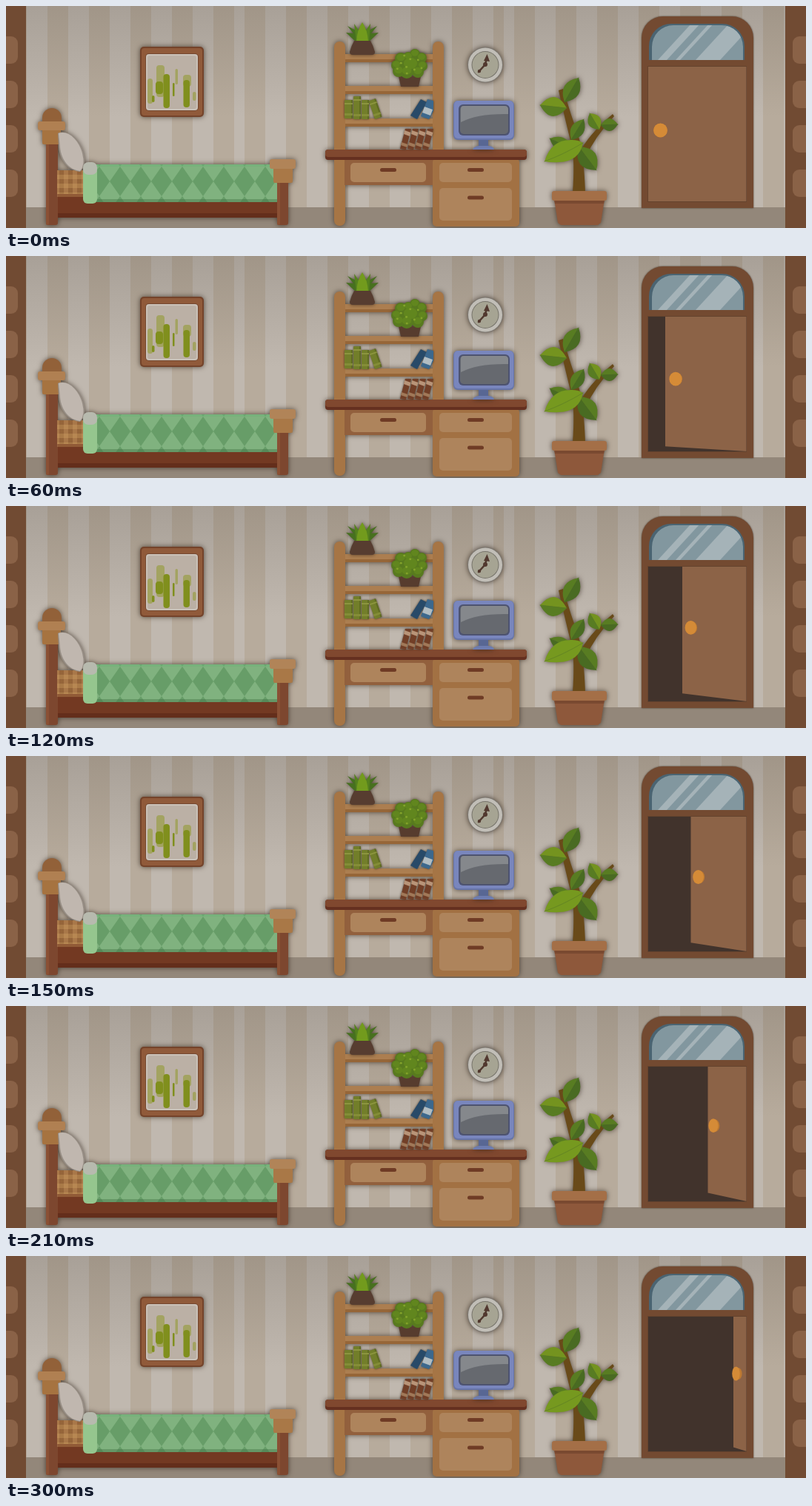
Recreate the animation shown at these times as an HTML page with a canvas. Size 1080 by 300 pixels, loop 0.75 s.

```html
<!DOCTYPE html>
<html lang="en">
<head>
<meta charset="utf-8">
<title>Room with an opening door</title>
<style>
html, body { margin: 0; width: 100%; height: 100%; overflow: hidden; background: #b9ab9c; }
canvas { display: block; width: 1080px; height: 300px; }
</style>
</head>
<body>
<canvas id="stage" width="1080" height="300"></canvas>
<script>
const W = 1080, H = 300;
const LOOP = 750, STEP = 30, STEPS = 10;
const stage = document.getElementById('stage').getContext('2d');

function layer() {
  const c = document.createElement('canvas');
  c.width = W;
  c.height = H;
  return c.getContext('2d');
}

const room = layer();
let g = room;

function box(x1, y1, x2, y2, fill, r = 0) {
  g.fillStyle = fill;
  g.beginPath();
  g.roundRect(x1, y1, x2 - x1, y2 - y1, r);
  g.fill();
}

function poly(fill, ...p) {
  g.fillStyle = fill;
  g.beginPath();
  for (let i = 0; i < p.length; i += 2) g.lineTo(p[i], p[i + 1]);
  g.closePath();
  g.fill();
}

function oval(x, y, rx, ry, fill) {
  g.fillStyle = fill;
  g.beginPath();
  g.ellipse(x, y, rx, ry, 0, 0, Math.PI * 2);
  g.fill();
}

function shape(d, fill) {
  g.fillStyle = fill;
  g.fill(new Path2D(d));
}

function stroke(d, color, width) {
  g.strokeStyle = color;
  g.lineWidth = width;
  g.lineCap = 'round';
  g.lineJoin = 'round';
  g.stroke(new Path2D(d));
}

// Pointed leaf from one tip to the other, in two tones
function leaf(x1, y1, x2, y2, wide, left, right) {
  const mx = (x1 + x2) / 2, my = (y1 + y2) / 2;
  const len = Math.hypot(x2 - x1, y2 - y1);
  const nx = (y2 - y1) / len * wide, ny = (x1 - x2) / len * wide;
  const half = (s, fill) => shape(
    `M${x1} ${y1} Q${mx + nx * s} ${my + ny * s} ${x2} ${y2} Z`, fill);
  half(1, left);
  half(-1, right);
  stroke(`M${x1} ${y1} L${x2} ${y2}`, right, 0.8);
}

// Draws a group with one soft shadow around it
function shaded(draw, blur = 7) {
  const back = g;
  g = layer();
  draw();
  back.save();
  back.shadowColor = 'rgba(40,28,18,.7)';
  back.shadowBlur = blur;
  back.drawImage(g.canvas, 0, 0);
  back.restore();
  g = back;
}

// Strips of striped paper: left edge, right edge, start of a light stripe
function wall() {
  box(0, 0, W, 272, '#b7ab9c');
  for (const [from, to, first] of [[27, 322, 28], [322, 672, 350], [672, 1052, 658]])
    for (let x = first; x < to; x += 56)
      box(Math.max(x, from), 0, Math.min(x + 28, to), 272, '#c0b8af');
  const shade = g.createLinearGradient(0, 0, 0, 150);
  shade.addColorStop(0, 'rgba(66,58,50,.19)');
  shade.addColorStop(1, 'rgba(66,58,50,0)');
  box(0, 0, W, 150, shade);
  box(0, 272, W, H, '#93877a');
}

function sides() {
  box(0, 0, 27, H, '#714b33');
  box(1052, 0, W, H, '#714b33');
  for (let y = 41; y < 240; y += 60) {
    box(-12, y, 16, y + 37, '#8a6247', 9);
    box(1062, y, 1092, y + 37, '#8a6247', 9);
  }
}

function picture() {
  box(181, 55, 267, 150, '#74432a', 5);
  box(183, 57, 265, 148, '#905a3a', 4);
  box(188, 64, 260, 142, '#74472f', 5);
  box(189, 65, 259, 141, '#cac1b8', 4);
  box(191, 67, 257, 139, '#bbb0a5', 3);
  const pale = '#a3a361', deep = '#808f1d';
  [[191, 98, 198, 132], [203, 80, 214, 123], [228.5, 85, 232, 106],
   [239, 93, 250, 109], [252, 116, 256.5, 128]].forEach(b => box(...b, pale, 4));
  [[202, 102, 212, 119], [212.5, 92, 221, 138], [225, 104, 227.5, 122],
   [239.5, 100, 248, 137], [197, 121, 200.5, 130]].forEach(b => box(...b, deep, 4));
}

function bed() {
  box(68, 250, 370, 286, '#733922');
  box(68, 280, 370, 286, '#642e1b');
  box(54, 180, 70, 296, '#7d472f', 3);
  box(54, 180, 58, 296, '#8a5034', 3);
  box(49, 138, 75, 172, '#926139', 13);
  box(49, 166, 74, 187, '#a67340', 2);
  box(43, 156, 80, 168, '#b08052', 3);

  box(69, 222, 106, 254, '#a97849');
  for (let x = 72; x < 106; x += 12) box(x, 222, x + 6, 254, 'rgba(105,58,25,.3)');
  for (let y = 228; y < 254; y += 12) box(69, y, 106, y + 6, 'rgba(215,170,105,.3)');
  shape('M70 172 C82 166 99 179 105 199 Q109 216 100 224 C84 222 73 210 71 191 Z', '#978e85');
  shape('M71 172 C83 167 98 180 103 199 Q107 215 100 223 C85 221 75 209 73 191 Z', '#c0b7af');

  g.save();
  g.beginPath();
  g.rect(115, 214, 251, 51);
  g.clip();
  box(115, 214, 366, 265, '#80b27f');
  for (let x = 126; x < 380; x += 28)
    for (let y = 197; y < 290; y += 40)
      poly('#679d68', x, y - 20, x + 14, y, x, y + 20, x - 14, y);
  box(115, 214, 366, 217, 'rgba(110,180,120,.5)');
  box(115, 261, 366, 265, 'rgba(60,110,65,.4)');
  g.restore();
  box(104, 214, 123, 267, '#95c68e', 6);
  box(104, 211, 123, 228, '#b7baae', 7);

  box(366, 236, 381, 296, '#7d472f', 3);
  box(366, 236, 370, 296, '#8a5034', 2);
  box(361, 216, 387, 239, '#a97847', 2);
  box(356, 207, 391, 220, '#b18458', 3);
}

function shelf() {
  for (const y of [65, 108, 152]) {
    box(456, y, 578, y + 11, '#966638');
    box(456, y, 578, y + 7, '#ac7e50');
  }
  box(443, 48, 458, 297, '#a67545', 7);
  box(576, 48, 591, 200, '#a67545', 7);
}

function desk() {
  box(457, 206, 577, 242, '#92603d');
  box(576, 206, 693, 298, '#a27143', 5);
  const face = '#ae845c';
  box(465, 212, 567, 238, face, 5);
  box(585, 212, 683, 238, face, 5);
  box(585, 246, 683, 290, face, 5);
  for (const [x, y] of [[505, 219], [623, 219], [623, 256.5]])
    box(x, y, x + 22, y + 5, '#6f3b25', 2.5);
  box(431, 194, 703, 208, '#653020', 4);
  box(431, 194, 703, 204, '#80482f', 4);
}

function greenBook(x, y, w, h) {
  box(x, y, x + w, y + h, '#727e2a', 1);
  box(x + w - 2, y, x + w, y + h, '#606b24');
  box(x, y + 4, x + w, y + 6, '#8c953f');
  box(x, y + h - 7, x + w, y + h - 4, '#848d38');
}

function books() {
  greenBook(457, 127, 11, 25);
  greenBook(469, 122, 10, 31);
  greenBook(480, 127, 10, 26);
  g.save();
  g.translate(498, 153);
  g.rotate(-0.33);
  greenBook(0, -26, 10, 26);
  g.restore();

  poly('#284a68', 546, 148, 560, 126, 568, 130, 555, 153);
  poly('#3c688d', 560, 149, 569, 126, 577, 128, 577, 142, 571, 153);
  poly('#b2bdc2', 562, 144, 565, 136, 576, 140, 573, 148);

  for (let x = 532; x < 570; x += 10) {
    poly('#723f27', x, 193, x + 7, 166, x + 15, 166, x + 8, 194);
    poly('#b89478', x + 5, 173, x + 6, 168, x + 14.5, 171, x + 13, 176);
    poly('#a07858', x + 1, 188, x + 2, 184, x + 10.5, 187, x + 9.5, 191);
  }
}

function grassPot() {
  const dark = '#47701f', light = '#729b1d';
  poly(dark, 472, 48, 459, 36, 469, 37, 461, 27, 474, 34, 479, 48);
  poly(dark, 490, 48, 503, 36, 493, 37, 501, 27, 488, 34, 483, 48);
  poly('#55811e', 473, 48, 470, 24, 481, 40, 492, 24, 490, 48);
  shape('M473 48 Q474 32 481 22 Q488 32 489 48 Z', light);
  shape('M470 47 H492 Q496 54 498 62 Q498 66 494 66 H468 Q464 66 464 62 Q466 54 470 47 Z', '#573d30');
}

function bush() {
  poly('#573c2e', 530, 95, 560, 95, 557, 109, 533, 109);
  const blobs = [[527, 80, 7], [533, 71, 8], [543, 69, 7], [552, 65, 7], [561, 70, 7],
    [562, 81, 7], [556, 89, 8], [541, 89, 9], [530, 88, 8], [546, 79, 13]];
  for (const [x, y, r] of blobs) oval(x, y, r, r, '#587a1f');
  for (const [x, y, r] of blobs) oval(x, y - 1.5, r * 0.7, r * 0.6, '#61861e');
  for (let i = 1; i < 10; i++) {
    const a = i * 2.4, r = 6 * Math.sqrt(i);
    oval(545 + Math.cos(a) * r, 79 + Math.sin(a) * r * 0.85, 1.5, 1.4, '#83a32b');
  }
}

function clock() {
  oval(647, 79.5, 24, 24, '#7d7871');
  oval(647, 79.5, 23, 23, '#c1beb7');
  oval(647, 79.5, 18.5, 18.5, '#76736a');
  oval(647, 79.5, 17.5, 17.5, '#a6a493');
  stroke('M638 89 L647 79 L649 70', '#51382f', 2.6);
  poly('#51382f', 649.5, 65, 653, 75, 645, 74);
  oval(647, 79, 3, 3, '#51382f');
  oval(639, 88, 2.2, 2.2, '#51382f');
}

function monitor() {
  box(638, 178, 651, 192, '#586794');
  shape('M630 194 Q632 189 640 189 H650 Q658 189 659 194 Z', '#6d7caf');
  box(604, 128, 686, 181, '#6674a8', 6);
  box(605, 128, 685, 179, '#7986bd', 5);
  box(611, 133, 680, 175, '#4d5370', 6);
  box(613, 135, 678, 173, '#66696f', 5);
  shape('M614 157 V139 Q614 135 618 135 H673 Q678 135 678 140 V146 Q637 145 614 157 Z', '#85888c');
}

function tree() {
  shape('M765 252 Q768 210 764 190 Q754 150 746 114 L752 112 Q762 145 774 180 Q780 200 782 252 Z', '#694a19');
  shape('M773 200 Q786 174 819 146 L821 149 Q796 175 781 207 Z', '#694a19');
  const light = '#74931f', mid = '#587c22', dark = '#496b22';
  leaf(754, 130, 773, 97, 22, mid, dark);
  leaf(721, 134, 757, 138, 26, light, mid);
  leaf(763, 181, 780, 153, 18, mid, dark);
  leaf(788, 145, 801, 167, 18, light, mid);
  leaf(803, 161, 826, 160, 17, mid, dark);
  leaf(734, 179, 765, 194, 18, mid, dark);
  leaf(773, 190, 797, 222, 25, mid, dark);
  shape('M727 210 Q736 180 764 181 Q773 181 779 185 Q774 210 747 211 Q737 212 727 210 Z', '#76991f');
  stroke('M727 210 Q752 201 779 185', '#648523', 1);
  poly('#8e583b', 740, 261, 808, 261, 803, 293, 799, 296, 749, 296, 745, 293);
  poly('#7a4930', 740, 261, 808, 261, 807, 267, 741, 267);
  box(737, 250, 811, 263, '#a46f47', 3);
}

function doorFrame() {
  box(858, 14, 1009, 273, '#734a31', [29, 29, 0, 0]);
  box(868, 24, 997, 73, '#4a6472', [30, 30, 0, 0]);
  g.save();
  g.beginPath();
  g.roundRect(872, 26, 123, 47, [29, 29, 0, 0]);
  g.clip();
  box(868, 24, 998, 73, '#82979f');
  for (const [x, w] of [[880, 12], [904, 6], [931, 33]])
    poly('#a5b3b8', x, 73, x + 45, 24, x + 45 + w, 24, x + w, 73);
  g.restore();
  box(866, 81, 1000, 265, '#64432d');
}

function door(step) {
  const left = 867 + 11.5 * step, lift = 0.031 * step * (1000 - left);
  g.save();
  g.beginPath();
  g.rect(867, 82, 132.5, 182);
  g.clip();
  box(867, 82, 1000, 264, '#41332c');
  poly('#8c6347', left, 82, 1000, 82, 1000, 264, left, 264 - lift);
  g.restore();
  const x = 883.5 + 10.2 * step, y = 168 - 0.9 * step, rx = 9.3 - 0.4 * step;
  oval(x + 0.28 * step, y, rx, 9.3 - 0.12 * step, '#bd7931');
  oval(x, y, rx, 9.4, '#d58b37');
}

wall();
shaded(picture);
shaded(bed);
shaded(() => { shelf(); desk(); });
shaded(books, 3);
shaded(grassPot, 5);
shaded(bush, 5);
shaded(clock);
shaded(monitor);
shaded(tree);
shaded(doorFrame, 2);
sides();

g = stage;
const start = performance.now();

function frame() {
  const time = (performance.now() - start) % LOOP;
  g.drawImage(room.canvas, 0, 0);
  door(Math.min(STEPS, Math.floor(time / STEP)));
  requestAnimationFrame(frame);
}
frame();
</script>
</body>
</html>
```
